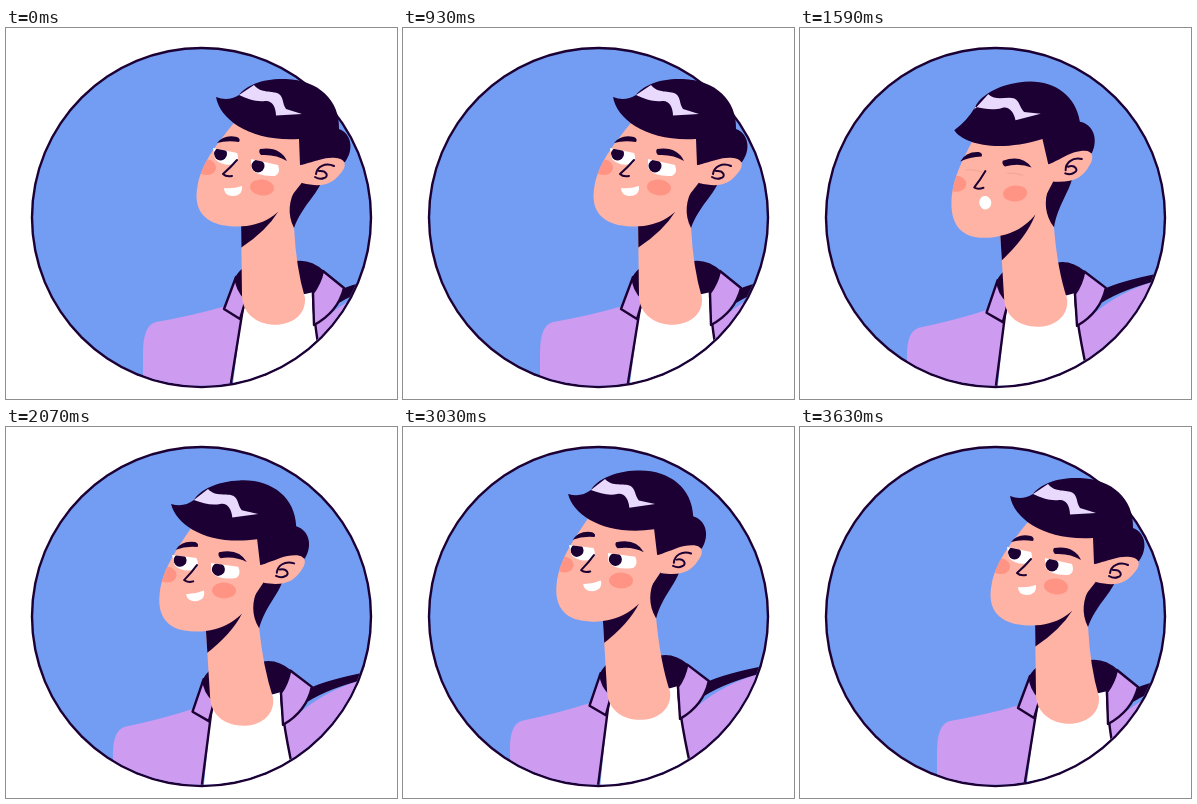
Write an HTML page with a canvas that moves like this. It is 391 px wide and 371 px high and loops after 3660 ms.

```html
<!DOCTYPE html>
<html lang="en">
<head>
<meta charset="utf-8">
<title>Portrait</title>
<style>
html, body { margin: 0; width: 100%; height: 100%; overflow: hidden; background: #fff; }
canvas { display: block; }
</style>
</head>
<body>
<canvas id="stage" width="391" height="371"></canvas>
<script>
const ctx = document.getElementById('stage').getContext('2d');
const LOOP = 3660, CX = 195.5, CY = 189.5;
const DARK = '#1c0033', SKIN = '#ffb3a5', CHEEK = '#ff9484', PURPLE = '#cd9bef', BLUE = '#739df3';

// Timing rules: a smooth step, a step that returns, and a single swing
const clamp = v => Math.min(1, Math.max(0, v));
const ease = (t, from, to) => (1 - Math.cos(Math.PI * clamp((t - from) / (to - from)))) / 2;
const hold = (t, inStart, inEnd, outStart, outEnd) => ease(t, inStart, inEnd) - ease(t, outStart, outEnd);
const swing = (t, from, to) => Math.sin(Math.PI * clamp((t - from) / (to - from))) ** 2;

function fill(color, d) {
  ctx.fillStyle = color;
  ctx.fill(new Path2D(d));
}

function line(width, d, color = DARK) {
  ctx.strokeStyle = color;
  ctx.lineWidth = width;
  ctx.stroke(new Path2D(d));
}

function oval(color, x, y, rx, ry, angle = 0) {
  ctx.fillStyle = color;
  ctx.beginPath();
  ctx.ellipse(x, y, rx, ry, angle, 0, 7);
  ctx.fill();
}

function isolated(draw) {
  ctx.save();
  draw();
  ctx.restore();
}

function within(m, draw) {
  isolated(() => {
    ctx.transform(m.a, m.b, m.c, m.d, m.e, m.f);
    draw();
  });
}

function clipped(d, draw) {
  isolated(() => {
    ctx.clip(new Path2D(d));
    draw();
  });
}

const pose = (x, y, dx, dy, angle) =>
  new DOMMatrix().translate(x + dx, y + dy).rotate(angle).translate(-x, -y);

function drawBody() {
  fill(DARK, 'M228 252Q234 238 246 237L290 233Q305 231 318 243L307 268L238 275Z');
  fill('#fff', 'M238 272L221 400H322L308 264L299 266Z');
  fill(PURPLE, 'M137 400V325Q137 297 150 294Q185 288 220 278L238 274L219 400Z');
  fill(PURPLE, 'M307 262Q307 298 322 370H430V246Q360 255 322 288Z');
  fill(DARK, 'M336 261Q358 251 430 241V247Q362 257 333 275Z');
  line(2.4, 'M238 274L219 392M307 264Q307 298 322 370');
  const lapels = 'M230 249L218 281L234 291L240 271Q230 262 230 249ZM317 243L338 260Q332 284 308 297L307 265Q314 256 317 243Z';
  fill(PURPLE, lapels);
  line(2.4, lapels);
}

// The neck joins a moving head to a moving body, so its ends follow both
function drawNeck(head, body) {
  const at = (matrix, x, y) => {
    const p = matrix.transformPoint({ x, y });
    return `${p.x} ${p.y} `;
  };
  const neck = `M${at(head, 235, 188)}L${at(body, 236, 268)}
    C${at(body, 237, 306)}${at(body, 301, 306)}${at(body, 299, 270)}
    Q${at(body, 290, 240)}${at(head, 288, 199)}L${at(head, 288, 160)}Z`;
  fill(SKIN, neck);
  clipped(neck, () => within(head, () => fill(DARK, 'M215 190L272 184Q258 207 222 228Z')));
}

function drawEye(open, x, y, white, pupilX, pupilY) {
  if (open < .08) {
    line(.8, `M${x - 8} ${y - 2}Q${x} ${y - 1} ${x + 7} ${y + 3}`, '#eda293');
    return;
  }
  isolated(() => {
    ctx.translate(x, y + 2 * (1 - open));
    ctx.rotate(.26);
    ctx.scale(1, open);
    ctx.rotate(-.26);
    ctx.translate(-x, -y);
    fill('#fff', white);
    clipped(white, () => oval(DARK, pupilX, pupilY, 6.5, 6.5));
  });
}

function drawBrow(drop, d) {
  isolated(() => {
    ctx.translate(-drop, drop);
    fill(DARK, d);
  });
}

function drawHead(flop, left, right, surprised) {
  fill(DARK, 'M316 152C312 166 296 178 288 200C281 186 283 172 290 160L296 145Z');
  const face = 'M232 90C214 112 196 133 191.5 158C187 182 198 198 230 198.5C256 199 274 187 287 166L298 152V100Z';
  fill(SKIN, face);
  clipped(face, () => oval(CHEEK, 200, 139, 10, 8, .2));
  oval(CHEEK, 256, 159.5, 12, 8, .1);

  const tip = `${210 - flop * .12} ${69 + flop}`;
  fill(DARK, `M${tip}Q222 ${74 + flop / 3} 233 67C240 57 258 50 280 51
    C312 52 334 72 333 101C346 106 348 122 339 134L294 137L293 111
    C245 ${114 + flop * .15} 214 ${92 + flop * .5} ${tip}Z`);
  fill('#e9d9fd', `M${233 - flop * .1} ${67 + flop * .15}L248 57C255 66 266 62 273 66C278 70 276 75 280 81
    L296 86L270 87.5C270 79 266 72 259 73C250 74 242 71 233 67Z`);
  fill(SKIN, 'M293 138L302 135C312 133 318 129 330 130C341 131 341 139 334 146C326 156 316 160 296 155Z');
  line(2, 'M328 138C319 134 311 139 310 146M313 143C321 142 323 149 318 150Q314 152 309 149');

  drawEye(left, 220, 129, 'M207 120L231 125Q234 132 229 136Q217 139 209 131Z', 214.5, 126);
  drawEye(right, 260, 140, 'M245 131L272 137Q275 145 269 148Q251 149 245 140Z', 252, 138);
  drawBrow(3 * (1 - left), 'M211 115Q218 106 231 109Q235 111 233 114Q221 112 211 115Z');
  drawBrow(4 * (1 - right), 'M254 121Q274 118 281 133Q270 126 255 127Q252 124 254 121Z');
  line(2, 'M231 132Q225 139 217 146Q220 149 226 148');

  if (surprised) oval('#fff', 225, 163, 6, 6.8);
  else fill('#fff', 'M218 160Q227 161 236 158Q237 168 226 168Q218 167 218 160Z');
}

function render(t) {
  const nod = swing(t, 150, 850);
  const lean = swing(t, 1330, 1850);
  const rise = swing(t, 2800, 3280);
  const dip = swing(t, 1230, 1570) + swing(t, 3130, 3470);
  const bodyShift = hold(t, 1200, 1580, 3100, 3530);
  const headShift = hold(t, 1200, 1580, 3220, 3620);
  const closed = hold(t, 360, 450, 510, 620) + hold(t, 1380, 1480, 1620, 1740);
  const wink = hold(t, 2320, 2450, 2720, 2850);

  const body = pose(271, 280, -31.5 * bodyShift, 2 * bodyShift + 12 * dip - 6 * rise, -1.8 * bodyShift - 3 * dip);
  const head = pose(256, 159,
    -38 * headShift - 4 * nod - 3 * lean,
    4 * headShift + nod + 2 * lean + 15 * dip - 10 * rise,
    -4.5 * headShift - 4 * nod - 6.2 * lean - 11 * dip);
  const scale = 1 + .021 * swing(t, 1050, 1330);

  ctx.setTransform(scale, 0, 0, scale, CX * (1 - scale), CY * (1 - scale));
  ctx.clearRect(-10, -10, 420, 400);
  ctx.lineCap = ctx.lineJoin = 'round';
  oval(DARK, CX, CY, 170.7, 170.7);
  oval(BLUE, CX, CY, 168.3, 168.3);
  isolated(() => {
    ctx.clip();
    within(body, drawBody);
    drawNeck(head, body);
  });
  const open = 1 - closed;
  within(head, () => drawHead(17 * lean + 6 * wink, open, open * (1 - .65 * wink), lean > .3));
}

const start = performance.now();
function frame() {
  render((performance.now() - start) % LOOP);
  requestAnimationFrame(frame);
}
frame();
</script>
</body>
</html>
```
